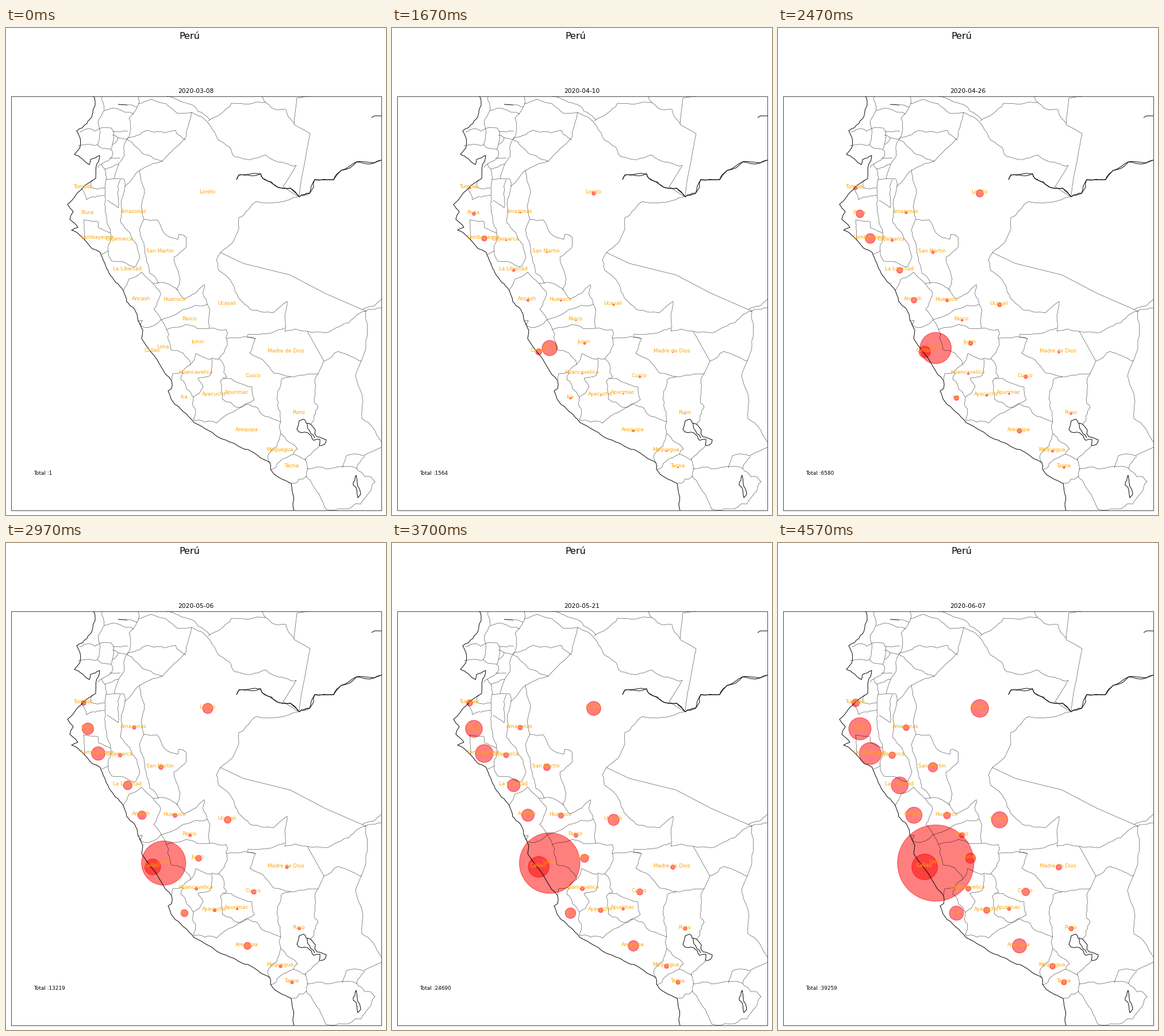
A matplotlib script that plays this animation: 661x848 px, repeating every 4.61 s.

```python
import numpy as np
import matplotlib.pyplot as plt
from matplotlib.animation import FuncAnimation
from matplotlib.collections import LineCollection
from matplotlib.patches import Rectangle

W, H, DPI = 661, 848, 64
LOOP_MS, STEP_MS = 4610, 10
PX = 72 / DPI          # one pixel in points
EDGE = 1.5 / PX        # marker outline in pixels
rng = np.random.default_rng(8)

# Totals known on a few days; their square roots grow evenly in between.
DAYS = [0, 15, 33, 49, 59, 74, 91]
TOTALS = [1, 75, 1564, 6580, 13219, 24690, 39259]

# name, x, y, last diameter, lateness (1 = grows along with the total)
REGIONS = [
    ("Tumbes", 135, 278.5, 14.5, 0.9),
    ("Piura", 142.5, 323.5, 40, 1.2),
    ("Lambayeque", 160.5, 366.5, 39.5, 0.9),
    ("Cajamarca", 198.5, 369.5, 12.5, 1.1),
    ("Amazonas", 223, 321.5, 11.5, 1.1),
    ("Loreto", 351, 288, 32, 1),
    ("San Martin", 269.5, 390.5, 17.5, 1.4),
    ("La Libertad", 211.7, 422, 30.5, 1.2),
    ("Ancash", 236.5, 474, 29.5, 1.2),
    ("Huanuco", 294, 474.5, 13, 1),
    ("Ucayali", 385.5, 482, 29.5, 1.6),
    ("Pasco", 320, 509, 10.5, 1.2),
    ("Lima", 274.3, 557.3, 134, 1),
    ("Callao", 255.2, 564, 46, 0.9),
    ("Junin", 335, 549, 19, 1),
    ("Madre de Dios", 488.5, 564.5, 11, 1.2),
    ("Huancavelica", 331, 602, 10, 1.1),
    ("Cusco", 431, 607.5, 14.5, 0.9),
    ("Ayacucho", 363, 639.5, 12, 1.3),
    ("Apurimac", 402, 637, 7, 1),
    ("Ica", 310.5, 644.5, 26, 1.3),
    ("Puno", 510, 671.5, 9, 1.1),
    ("Arequipa", 420, 701.5, 26, 1.3),
    ("Moquegua", 477.5, 737, 11, 1.2),
    ("Tacna", 497.5, 765, 10, 1),
]

thin, thick = [], []


def rough(points, wiggle):
    """Break long segments at their middle, pushed sideways at random."""
    for _ in range(4):
        out = [points[0]]
        for a, b in zip(points, points[1:]):
            dx, dy = b - a
            if np.hypot(dx, dy) > 8:
                out.append((a + b) / 2 + wiggle * rng.normal() * np.array([-dy, dx]))
            out.append(b)
        points = np.array(out)
    return points


def border(*xy, wiggle=0.08):
    thin.append(rough(np.reshape(xy, (-1, 2)).astype(float), wiggle))


def shore(*xy, wiggle=0.05):
    thick.append(rough(np.reshape(xy, (-1, 2)).astype(float), wiggle))


# Pacific coast, north to south
shore(152, 119, 155, 135, 141, 166, 123, 179, 129, 192, 125, 213, 119, 220,
      145, 238, 147, 229, 163, 222, 156, 262, 132, 280, 107, 307, 117, 320,
      111, 333, 125, 347, 114, 352, 164, 391, 204, 457, 238, 526, 236, 541,
      253, 565, 288, 614, 288, 628, 282, 632, 290, 650, 327, 687, 377, 716,
      421, 734, 459, 757, 460, 768, 496, 793, 501, 840)

# Both banks of the Amazon
for _ in range(2):
    shore(401, 264, 405, 256, 443, 254, 447, 262, 475, 278, 495, 279, 510, 294,
          528, 288, 537, 264, 570, 264, 583, 248, 610, 233, 640, 235, 653, 230)
shore(636, 156, 641, 153, 653, 153, wiggle=0)
shore(195, 133, 211, 134, wiggle=0)

# Lakes
shore(510, 684, 518, 681, 530, 690, 541, 712, 557, 717, 545, 727, 546, 716,
      535, 718, 525, 705, 506, 699, 510, 684, wiggle=0.15)
shore(524, 688, 530, 706, 537, 714, wiggle=0.15)
shore(609, 779, 611, 793, 617, 812, 612, 818, 604, 796, 609, 779, wiggle=0.1)

# Ecuador
border(167, 119, 171, 143, 163, 175, 159, 203, 166, 209)
border(171, 144, 200, 143, 222, 150)
border(211, 134, 228, 138)
border(230, 119, 228, 138, 214, 157, 216, 181, 210, 194)
border(128, 181, 163, 175, 183, 174, 185, 203, 182, 211, 166, 209)
border(185, 186, 195, 191, 209, 194)
border(185, 203, 195, 191)
border(186, 180, 212, 180)
border(125, 205, 159, 203)
border(210, 194, 206, 222, 196, 237, 188, 262)
border(182, 211, 186, 219, 166, 237, 160, 243)
border(180, 226, 199, 227)
border(166, 237, 172, 246, 196, 237)
border(172, 246, 174, 264)
border(210, 193, 245, 178, 295, 178, 313, 195)
border(210, 194, 240, 220, 272, 232)
border(230, 132, 252, 124, 299, 149, 323, 147, 313, 190, 272, 232, 232, 248,
       207, 276, 205, 263, 174, 264, 172, 278, 147, 278, 150, 264, wiggle=0.04)

# Colombia
border(279, 119, 322, 133, 340, 147, 355, 160)
border(323, 147, 352, 166, 373, 197, 398, 224, 452, 221, 465, 230, 505, 239)
border(505, 239, 482, 276, 508, 293, wiggle=0.01)
border(352, 162, 392, 131, 452, 130, 462, 139, 487, 142, 501, 166)
border(446, 119, 452, 130)
border(528, 119, 506, 122, 501, 168, 529, 184, 510, 292, wiggle=0.01)

# Brazil
border(510, 293, 436, 302, 405, 330, 405, 350, 394, 374, 373, 391, 366, 404,
       370, 422, 395, 447, 404, 470, 425, 490, 465, 496, 489, 476, 485, 500,
       485, 528, 524, 528, wiggle=0.05)
border(373, 391, 413, 410, 494, 430, 555, 462, 626, 493, wiggle=0)
border(524, 528, 560, 530, 630, 490, 653, 487, wiggle=0.05)
border(620, 490, 653, 472)

# Bolivia and Chile
border(626, 492, 626, 552, 618, 580, 608, 606, 617, 632, 619, 680, 653, 721,
       wiggle=0.05)
border(553, 580, 578, 563, 618, 580)
border(524, 528, 553, 580, 543, 602, wiggle=0)
border(543, 602, 536, 645, 543, 660, 530, 690)
border(545, 728, 520, 751, 525, 768, 523, 780, 496, 793)
border(522, 780, 545, 812, 557, 839, wiggle=0.05)
border(523, 768, 556, 768, 610, 767, 642, 790, 617, 829, 557, 838)
border(585, 766, 592, 745, 622, 745, 653, 730)
border(610, 767, 624, 746)

# Northern departments
border(132, 280, 140, 299, 172, 291, 172, 278)
border(172, 291, 173, 322, 178, 345, 182, 357, 178, 388, 166, 394)
border(137, 369, 135, 334, 160, 337, 161, 348, 182, 357, wiggle=0.02)
border(178, 388, 184, 406, 226, 415, 233, 398)
border(176, 300, 195, 313, 199, 264)
border(207, 276, 199, 338, 228, 378, 233, 398, wiggle=0.05)
border(232, 248, 241, 282, 235, 312, 240, 333, 232, 352, 250, 427, 265, 445,
       wiggle=0.05)
border(240, 333, 263, 334, 275, 357, 299, 368, 301, 359, 314, 365, 313, 382,
       292, 399, 303, 437, 297, 457, wiggle=0.05)
border(204, 457, 214, 437, 236, 425, 256, 445, 283, 446, 310, 472, 345, 447,
       350, 481)
border(256, 445, 269, 463, 257, 490, 270, 508, 297, 498, 350, 481, 354, 523)
border(229, 511, 237, 509, 232, 516, 240, 521, 270, 508, 279, 525)

# Central departments
border(279, 525, 300, 521, 354, 523, 383, 525, 385, 552, 370, 576)
border(279, 525, 287, 560, 308, 566, 321, 586, 330, 567, 370, 576)
border(288, 613, 290, 602, 305, 600, 321, 586)
border(309, 600, 304, 612, 326, 643, 326, 683)
border(326, 643, 343, 625, 334, 610, 355, 605, 358, 576)
border(370, 576, 384, 608, 373, 615, 376, 646, 407, 661, 432, 647, 428, 625,
       402, 617, 378, 611)
border(383, 541, 434, 541)
border(434, 541, 420, 538, 421, 533, 462, 531, 485, 522, wiggle=0.04)
border(434, 541, 424, 566, 447, 578, 466, 601, 495, 607, 543, 602, wiggle=0.05)

# Southern departments
border(326, 683, 366, 688, 380, 676, 407, 661, 437, 661, 447, 674, 478, 686)
border(495, 607, 479, 612, 472, 640, 478, 686, 478, 706, 455, 746, 459, 757)
border(478, 706, 507, 733, 500, 742, 522, 752)
border(461, 769, 476, 755, 500, 742)

fig = plt.figure(figsize=(W / DPI, H / DPI), dpi=DPI, facecolor="white")
ax = fig.add_axes([0, 0, 1, 1])
ax.set(xlim=(0, W), ylim=(H, 0))
ax.axis("off")

names, xs, ys, last, late = zip(*REGIONS)
spots, last, late = np.column_stack([xs, ys]), np.array(last), np.array(late)

dots = ax.scatter([], [], color="red", alpha=0.5, linewidths=1.5, zorder=1)
for lines, width in ((thin, 0.5), (thick, 1.1)):
    ax.add_collection(LineCollection(lines, colors="black", linewidths=width,
                                     zorder=2), autolim=False)
ax.add_patch(Rectangle((8.5, 118.5), 644, 721, fill=False, lw=0.8, zorder=3))

for name, x, y in zip(names, xs, ys):
    ax.text(x - 1.2, y + 0.3, name, color="orange", size=10, ha="center",
            zorder=4)
ax.text(319.2, 19, "Perú", size=18, ha="center")
date_text = ax.text(330.5, 113.2, "", size=12, ha="center")
total_text = ax.text(48.3, 777.8, "", size=10)


def day_at(ms):
    """Days alternate between 70 ms and 30 ms on screen."""
    pair, rest = divmod(ms, 100)
    return min(2 * pair + (rest >= 70), DAYS[-1])


def date_of(day):
    month, date = 3, 8 + day
    for length in (31, 30, 31):
        if date <= length:
            break
        month, date = month + 1, date - length
    return f"2020-{month:02d}-{date:02d}"


def update(frame):
    day = day_at(frame * STEP_MS)
    root = np.interp(day, DAYS, np.sqrt(TOTALS))
    share = root / np.sqrt(TOTALS[-1])
    inner = (last - EDGE) * share ** late
    shown = inner > 0.8
    dots.set_offsets(spots[shown])
    dots.set_sizes((inner[shown] * PX) ** 2)
    date_text.set_text(date_of(day))
    total_text.set_text(f"Total :{round(root ** 2)}")
    return dots, date_text, total_text


anim = FuncAnimation(fig, update, frames=LOOP_MS // STEP_MS, interval=STEP_MS,
                     repeat=True, repeat_delay=0, cache_frame_data=False)
plt.show()
```
